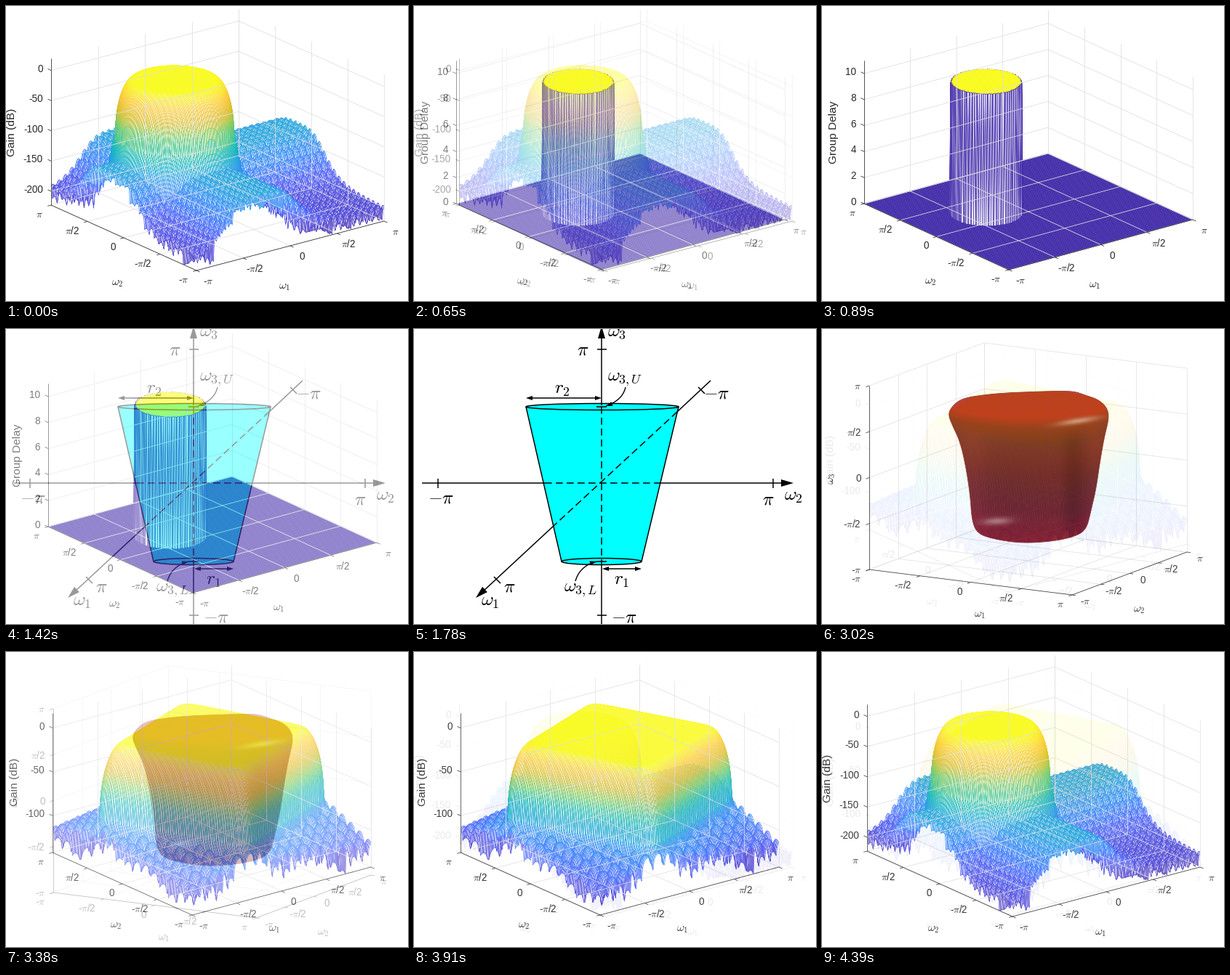
Animation, 553 px wide and 406 px high, one loop 4450 ms. Source, as a matplotlib script:

```python
import numpy as np
import matplotlib.pyplot as plt
from matplotlib.animation import FuncAnimation
from matplotlib.collections import LineCollection, PolyCollection
from matplotlib.colors import LinearSegmentedColormap
from matplotlib.patches import Ellipse, Polygon

W, H, DPI = 553, 406, 64
PT = 72 / DPI  # points per pixel
STEP, HOLD, FADE, SCENE = 10, 350, 60, 890  # ms
INK, GRID = "#262626", "#dfdfdf"

plt.rcParams["font.family"] = "Liberation Sans"
plt.rcParams["mathtext.fontset"] = "cm"

PI_NAMES = [r"-$\pi$", r"-$\pi$/2", "0", r"$\pi$/2", r"$\pi$"]
PARULA = LinearSegmentedColormap.from_list("parula", [
    (0.242, 0.150, 0.660), (0.275, 0.235, 0.830), (0.278, 0.356, 0.974),
    (0.196, 0.485, 0.989), (0.154, 0.590, 0.922), (0.055, 0.700, 0.770),
    (0.190, 0.770, 0.610), (0.504, 0.799, 0.348), (0.863, 0.741, 0.160),
    (0.993, 0.790, 0.215), (0.977, 0.984, 0.080)])


def write(ax, x, y, s, size=13.5, color=INK, **kw):
    kw = {"ha": "center", "va": "center", **kw}
    ax.text(x, y, s, fontsize=size * PT, color=color, **kw)


def lines(ax, segments, color, width, **kw):
    ax.add_collection(LineCollection(segments, colors=color, linewidths=width * PT, **kw))


class Box:
    """Orthographic 3D axes given by three floor corners on the screen."""

    def __init__(self, ax, left, front, right, height, zlim):
        self.ax, self.height, self.zlim = ax, height, zlim
        self.left, self.front, self.right = (np.array(p, float) for p in (left, front, right))
        self.back = self.left + self.right - self.front

    def rise(self, z):
        low, high = self.zlim
        return (z - low) / (high - low) * self.height

    def grid(self, zticks):
        l, f, r, b = self.left, self.front, self.right, self.back
        top = np.array([0, -self.height])
        segs = []
        for t in np.linspace(0, 1, 5):
            p, q = l + t * (b - l), b + t * (r - b)
            segs += [(p, p + top), (q, q + top)]
            segs += [(p, f + t * (r - f)), (q, l + t * (f - l))]
        for z in zticks:
            h = np.array([0, -self.rise(z)])
            segs += [(l + h, b + h), (b + h, r + h)]
        lines(self.ax, segs, GRID, 0.8)

    def axes(self, zticks, znames, zdir, left_names, right_off=(16, 15), zshift=-2):
        l, f, r = self.left, self.front, self.right
        out_l = (f - r) / np.hypot(*(f - r)) * 5
        out_r = (f - l) / np.hypot(*(f - l)) * 5
        out_z = zdir / np.hypot(*zdir) * 5
        segs = [(l, f), (f, r), (l, l - [0, self.height])]
        for i, t in enumerate(np.linspace(0, 1, 5)):
            p, q = l + t * (f - l), f + t * (r - f)
            segs += [(p, p + out_l), (q, q + out_r)]
            write(self.ax, p[0] - 11, p[1] + 13, left_names[i], ha="right")
            write(self.ax, q[0] + right_off[0], q[1] + right_off[1], PI_NAMES[i])
        for z, name in zip(zticks, znames):
            p = l - [0, self.rise(z)]
            segs.append((p, p + out_z))
            write(self.ax, p[0] - 11, p[1] + zshift, name, ha="right")
        lines(self.ax, segs, INK, 0.75)

    def mesh(self, height, n, shade=np.mean, width=0.6):
        """Wire surface with hidden lines, painted from back to front."""
        w = np.linspace(1, -1, n)
        a, b = np.meshgrid(w, w, indexing="ij")
        z = height(a, b)
        c = (self.left + self.right) / 2
        e1, e2 = (self.right - self.front) / 2, (self.left - self.front) / 2
        p = c + a[..., None] * e1 + b[..., None] * e2
        p[..., 1] -= self.rise(z)

        def corners(m):
            return np.stack([m[:-1, :-1], m[1:, :-1], m[1:, 1:], m[:-1, 1:]], axis=2)

        level = shade(corners(z), axis=2).ravel()
        level = (level - z.min()) / (z.max() - z.min())
        self.ax.add_collection(PolyCollection(
            corners(p).reshape(-1, 4, 2), facecolors="white",
            edgecolors=PARULA(level), linewidths=width * PT))


def lobes(w, n):
    return 20 * np.log10(np.abs(np.sin(n * np.pi * w + 0.9)) + 0.005)


def shoulder(d, start, width, drop, slope):
    """Flat top, quarter-ellipse edge, then a steep fall."""
    s = np.clip((d - start) / width, 0, 1)
    return -drop * (1 - np.sqrt(1 - s**2)) - slope * np.clip(d - start - width, 0, None)


def round_gain(a, b):
    d1, d2 = np.abs(a + 0.31), np.abs(b - 0.19)
    arm1, arm2 = (1 / (1 + (d / 0.42)**4) for d in (d1, d2))
    stop = -197 + 75 * np.maximum(arm1, arm2)
    stop += (0.9 - 0.6 * arm2) * lobes(a, 15) + (0.9 - 0.6 * arm1) * lobes(b, 15)
    top = shoulder(np.hypot(d1, d2), 0.34, 0.16, 90, 900)
    return np.clip(np.maximum(top, stop), -223, 0)


def square_gain(a, b):
    t = np.radians(23)
    u = np.abs(a * np.cos(t) + b * np.sin(t))
    v = np.abs(b * np.cos(t) - a * np.sin(t))
    d = (u**14 + v**14)**(1 / 14)
    stop = -86 - 45 * np.clip(d - 0.75, 0, None) + 0.8 * (lobes(a, 8) + lobes(b, 8))
    return np.clip(np.maximum(shoulder(d, 0.6, 0.16, 80, 700), stop), -142, 0)


def delay(a, b):
    return np.where(np.hypot(a + 0.31, b - 0.19) < 0.305, 10.1, 0.0)


def omega(i):
    return rf"$\omega_{{\mathsf{{{i}}}}}$"


def surface_scene(ax, corners, zlim, zticks, title, title_at, names_at, height, n, **kw):
    box = Box(ax, *corners, zlim)
    box.grid(zticks)
    box.mesh(height, n, **kw)
    box.axes(zticks, [str(z) for z in zticks], box.left - box.front, PI_NAMES[::-1])
    write(ax, *title_at, title, 15.4, rotation=90)
    for i, at in zip((1, 2), names_at):
        write(ax, *at, omega(i), 15.4)


def gain_scene(ax):
    surface_scene(ax, ((62, 274), (262, 364), (520, 296), 202), (-223, 20),
                  range(0, -201, -50), "Gain (dB)", (8, 174), ((383, 387), (153, 382)),
                  round_gain, 200)


def delay_scene(ax):
    surface_scene(ax, ((58, 272), (257, 363), (510, 294), 197), (0, 11),
                  range(0, 11, 2), "Group Delay", (16, 174), ((375, 385), (149, 380)),
                  delay, 170, shade=np.min, width=0.7)


def square_scene(ax):
    surface_scene(ax, ((64, 276), (256, 362), (502, 296), 192), (-142, 17),
                  range(0, -101, -50), "Gain (dB)", (12, 179), ((369, 382), (151, 377)),
                  square_gain, 190)


def head(ax, tip, direction, length, half):
    tip, d = np.array(tip, float), np.array(direction, float)
    d /= np.hypot(*d)
    side = np.array([-d[1], d[0]]) * half
    base = tip - d * length
    ax.add_patch(Polygon([tip, base + side, base - side], fc="k", ec="none", zorder=4))


def pointer(ax, p, q, r):
    t = np.linspace(0, 1, 30)[:, None]
    p, q, r = (np.array(v, float) for v in (p, q, r))
    lines(ax, [(1 - t)**2 * p + 2 * t * (1 - t) * q + t**2 * r], "k", 1.4, zorder=3)
    head(ax, r, r - q, 9, 3)


def cone_scene(ax):
    cyan, lw = "#00ffff", 1.5
    ax.add_patch(Polygon([(154, 107), (364, 107), (313, 320), (203, 320)], fc=cyan, ec="none"))
    for center, rx in (((259, 107), 105), ((258, 320), 55)):
        ax.add_patch(Ellipse(center, 2 * rx, 9, fc=cyan, ec="k", lw=lw * PT))
    lines(ax, [
        [(154, 107), (203, 320)], [(364, 107), (313, 320)],
        [(258, 0), (258, 105)], [(258, 320), (258, 406)],
        [(11, 212), (180, 212)], [(338, 212), (510, 212)],
        [(408, 71), (362, 114)], [(192, 271), (95, 361)],
        [(252, 28), (265, 28)], [(252, 394), (265, 394)],
        [(33, 206), (33, 219)], [(494, 206), (494, 219)],
        [(391, 80), (400, 89)], [(110, 341), (119, 350)],
        [(251, 107), (265, 107)], [(251, 320), (265, 320)],
        [(158, 95), (254, 95)], [(263, 330), (309, 330)]], "k", lw, zorder=3)
    lines(ax, [[(258, 107), (258, 320)], [(180, 212), (338, 212)], [(362, 114), (192, 271)]],
          "k", lw, linestyles=[(0, (6.5, 3.5))], zorder=3)
    for tip, way in (((258, -4), (0, -1)), ((522, 212), (1, 0)), ((85, 370), (-323, 299))):
        head(ax, tip, way, 17, 5)
    for x, y, way in ((154, 95, -1), (258, 95, 1), (259, 330, -1), (313, 330, 1)):
        head(ax, (x, y), (way, 0), 9, 3)
    pointer(ax, (291, 80), (287, 98), (264, 106))
    pointer(ax, (222, 347), (228, 326), (251, 320))
    for x, y, s in ((279, 4, r"\omega_3"), (232, 29, r"\pi"), (290, 69, r"\omega_{3,U}"),
                    (204, 83, "r_2"), (416, 89, r"-\pi"), (37, 233, r"-\pi"),
                    (487, 235, r"\pi"), (522, 230, r"\omega_2"), (289, 396, r"-\pi"),
                    (131, 354, r"\pi"), (105, 375, r"\omega_1"), (285, 346, "r_1"),
                    (229, 359, r"\omega_{3,L}")):
        write(ax, x, y, f"${s}$", 25.5, "k", zorder=5)


def smooth(points):
    """Closed curve by corner cutting."""
    p = np.array(points, float)
    for _ in range(4):
        q = np.roll(p, -1, axis=0)
        p = np.stack([0.75 * p + 0.25 * q, 0.25 * p + 0.75 * q], axis=1).reshape(-1, 2)
    return p


def solid_scene(ax):
    box = Box(ax, (65, 331), (344, 366), (502, 307), 253, (-1, 1))
    zticks = np.linspace(-1, 1, 5)
    box.grid(zticks)

    outline = smooth([
        (182, 103), (195, 95), (220, 91), (250, 88), (300, 86), (345, 85), (362, 91),
        (380, 97), (392, 108), (395, 122), (388, 150), (382, 185), (377, 220), (370, 250),
        (364, 275), (350, 285), (320, 292), (275, 295), (235, 289), (213, 281), (206, 262),
        (204, 230), (198, 190), (190, 155), (179, 132), (173, 116)])
    y, x = np.mgrid[:H, :W].astype(float)
    rim = 114 + 18 * np.sqrt(np.clip(1 - ((x - 284) / 110)**2, 0, 1))
    stops = [-45, -10, 4, 25, 70, 120, 160]
    shades = [(180, 46, 30), (184, 44, 26), (140, 46, 26), (114, 42, 28),
              (106, 28, 32), (110, 22, 34), (134, 20, 34)]
    rgb = np.stack([np.interp(y - rim, stops, c) for c in zip(*shades)], axis=-1)
    # soft side light, then two glossy spots
    below = np.clip((y - rim) / 30, 0, 1)
    rgb += (below * (14 * np.exp(-((x - 205) / 22)**2) + 14 * np.exp(-((x - 378) / 16)**2)
                     - 14 * np.exp(-((x - 345) / 14)**2)))[..., None] * [1, 0.4, 0.4]
    for cx, cy, sx, sy, tilt, power in ((352, 126, 27, 4, -0.15, 0.6), (240, 264, 20, 5, -0.05, 0.5)):
        glow = power * np.exp(-((x - cx) / sx)**2 - ((y - cy - tilt * (x - cx)) / sy)**2)
        rgb += glow[..., None] * (np.array([225, 200, 190]) - rgb)
    img = ax.imshow(np.clip(rgb, 0, 255).astype(np.uint8), extent=(0, W, H, 0),
                    aspect="auto", zorder=2)
    patch = Polygon(outline, fc="none", ec="#8a2a28", lw=0.8 * PT, zorder=2.1)
    ax.add_patch(patch)
    img.set_clip_path(patch)

    box.axes(zticks, PI_NAMES, box.left - box.back, PI_NAMES, (18, 9), 1)
    write(ax, 217, 394, omega(1), 15.4)
    write(ax, 436, 387, omega(2), 15.4)
    write(ax, 14, 206, omega(3), 15.4, rotation=90)


fig = plt.figure(figsize=(W / DPI, H / DPI), dpi=DPI, facecolor="white")


def stage():
    ax = fig.add_axes([0, 0, 1, 1])
    ax.axis("off")
    ax.set(xlim=(0, W), ylim=(H, 0))
    return ax


def render(draw):
    ax = stage()
    draw(ax)
    ax.set(xlim=(0, W), ylim=(H, 0))
    fig.canvas.draw()
    pixels = np.array(fig.canvas.buffer_rgba())[..., :3].astype(float)
    fig.clear()
    return pixels


scenes = [render(d) for d in (gain_scene, delay_scene, cone_scene, solid_scene, square_scene)]
screen = stage().imshow(scenes[0].astype(np.uint8), extent=(0, W, H, 0),
                        aspect="auto", interpolation="nearest")


def update(frame):
    k, t = divmod(frame * STEP, SCENE)
    mix = 0 if t < HOLD else ((t - HOLD) // FADE + 1) / 10
    picture = (1 - mix) * scenes[k] + mix * scenes[(k + 1) % len(scenes)]
    screen.set_data(np.round(picture).astype(np.uint8))
    return [screen]


anim = FuncAnimation(fig, update, frames=SCENE * len(scenes) // STEP, interval=STEP,
                     repeat=True, repeat_delay=0)
plt.show()
```
